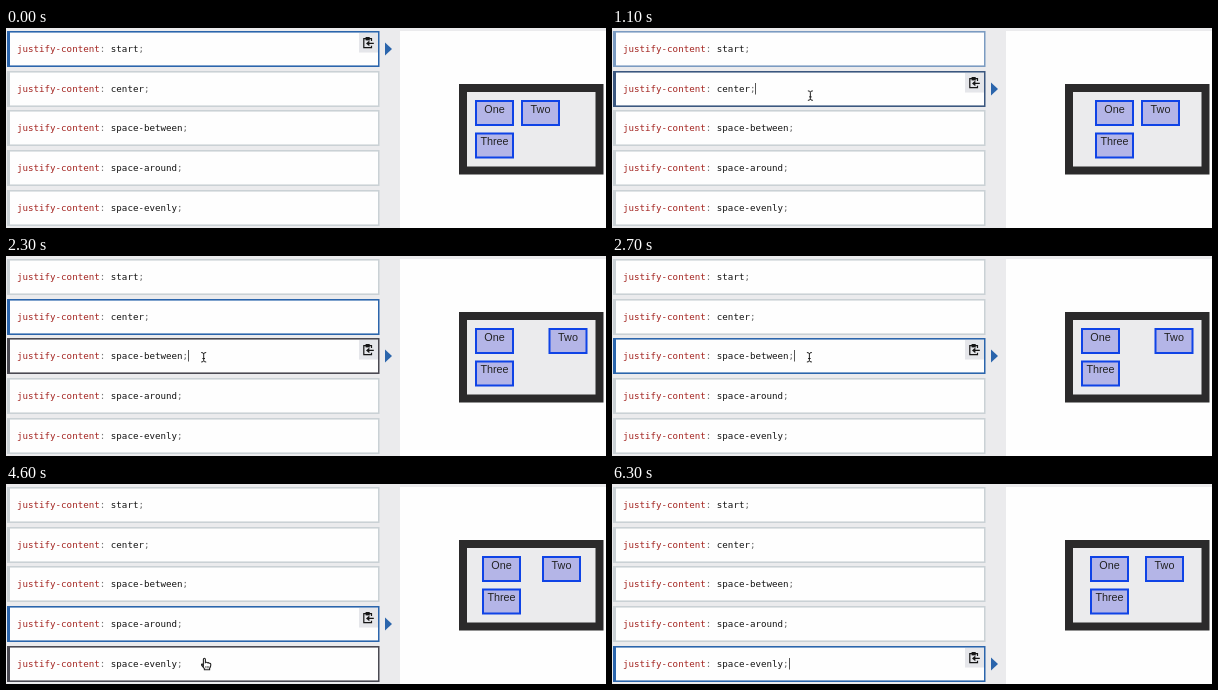
Recreate the animation shown at these times as an HTML page with a canvas. Size 600 by 200 pixels, loop 6400 ms.

```html
<!DOCTYPE html>
<html lang="en">
<head>
<meta charset="utf-8">
<title>justify-content</title>
<style>
html, body { margin: 0; width: 100%; height: 100%; overflow: hidden; background: #ebebed; }
canvas { display: block; width: 600px; height: 200px; }
</style>
</head>
<body>
<canvas id="stage" width="600" height="200"></canvas>
<script>
const ctx = document.getElementById('stage').getContext('2d');
const LOOP = 6400, STEP = 100, FADE = 200;
const IDLE = [202, 209, 213], HOVER = [74, 73, 82], BLUE = [43, 101, 172];
const CHAR = 5.52;

// on/off: selected span, hover: spans under the pointer, one/two: box positions
const rows = [
  { value: 'start', on: -1000, off: 1000, hover: [], one: 469, two: 515 },
  { value: 'center', on: 1000, off: 2300, hover: [[320, 1650]], one: 483, two: 529 },
  { value: 'space-between', on: 2300, off: 4000, hover: [[180, 320], [1650, 3370]], one: 469, two: 542.5 },
  { value: 'space-around', on: 4000, off: 4900, hover: [[120, 180], [3370, 4380]], one: 476, two: 536 },
  { value: 'space-evenly', on: 4900, off: 9999, hover: [[80, 120], [4380, 5800]], one: 478, two: 533 }
];

const pointerPath = [
  [100, 205, 212], [200, 203, 150], [300, 200, 98], [400, 199, 68],
  [1500, 198, 67], [1700, 199, 95], [1900, 198, 101], [3200, 197, 101],
  [3400, 199, 133], [3600, 199, 142], [4250, 199, 142], [4450, 200, 174],
  [4600, 200, 180], [5700, 200, 180], [5900, 203, 215]
];
const beamTimes = [[1000, 1600], [2300, 3700], [4000, 4400], [4900, 5800]];

const clamp = v => Math.max(0, Math.min(1, v));
const mix = (a, b, k) => a.map((v, i) => v + (b[i] - v) * k);
const rgb = c => `rgb(${c.map(Math.round).join(',')})`;
const within = (t, [a, b]) => t >= a && t < b;

function rect(x, y, w, h, color) {
  ctx.fillStyle = color;
  ctx.fillRect(x, y, w, h);
}

function text(str, x, y, color) {
  ctx.fillStyle = color;
  ctx.fillText(str, x, y);
}

// Fade level of a span: rises from a, falls from b
function level(t, [a, b]) {
  const peak = clamp((Math.min(t, b) - a) / FADE);
  return clamp(peak - Math.max(0, t - b) / FADE);
}

function drawCopyButton(y) {
  rect(353, y + 2, 19, 19.5, '#e5e6ea');
  ctx.save();
  ctx.translate(357, y + 6);
  ctx.strokeStyle = '#151515';
  ctx.lineWidth = 1.2;
  ctx.beginPath();
  ctx.moveTo(8.5, 4);
  ctx.lineTo(8.5, 1.6);
  ctx.lineTo(0.8, 1.6);
  ctx.lineTo(0.8, 10.6);
  ctx.lineTo(8.5, 10.6);
  ctx.lineTo(8.5, 8.8);
  ctx.moveTo(10.8, 6.4);
  ctx.lineTo(4.5, 6.4);
  ctx.stroke();
  rect(2.6, 0, 4.1, 3.4, '#151515');
  triangle(3, 6.4, 6.4, 3.6, 6.4, 9.2, '#151515');
  ctx.restore();
}

function triangle(x1, y1, x2, y2, x3, y3, color) {
  ctx.fillStyle = color;
  ctx.beginPath();
  ctx.moveTo(x1, y1);
  ctx.lineTo(x2, y2);
  ctx.lineTo(x3, y3);
  ctx.fill();
}

function drawRow(row, i, t) {
  const y = Math.round(3 + i * 39.7), h = 36;
  const hover = Math.max(0, ...row.hover.map(span => level(t, span)));
  const color = mix(mix(IDLE, HOVER, hover), BLUE, level(t, [row.on, row.off]));
  rect(1, y, 372.5, h, rgb(color));
  rect(4, y + 1.6, 368, h - 3.2, '#fefefe');

  const base = y + 21;
  ctx.font = '9.17px "DejaVu Sans Mono", monospace';
  ctx.textAlign = 'left';
  text('justify-content', 11, base, '#a3231f');
  text(':', 11 + 15 * CHAR, base, '#777');
  text(row.value, 11 + 17 * CHAR, base, '#111');
  const end = 17 + row.value.length;
  text(';', 11 + end * CHAR, base, '#666');

  if (!within(t, [row.on, row.off])) return;
  drawCopyButton(y);
  triangle(379, y + 11.5, 386, y + 18, 379, y + 24.5, rgb(BLUE));
  if (i && (t - row.on) % 1000 < 500) {
    rect(Math.round(11 + (end + 1) * CHAR), y + 12, 1, 11.5, '#555');
  }
}

function drawBox(label, x, y) {
  rect(x, y, 39, 26, '#0f43e6');
  rect(x + 2, y + 2, 35, 22, '#b4b5e7');
  ctx.font = '10.8px "Liberation Sans", Arial, sans-serif';
  ctx.textAlign = 'center';
  text(label, x + 19.5, y + 12.7, '#222');
}

function drawPreview(t) {
  const { one, two } = rows.find(r => within(t, [r.on, r.off]));
  rect(394, 3, 206, 197, '#fefefe');
  rect(453, 56, 144.5, 90.5, '#2b2a2b');
  rect(461, 64, 128.5, 74.5, '#ebebed');
  drawBox('One', one, 72);
  drawBox('Two', two, 72);
  drawBox('Three', one, 104.5);
}

function pointerAt(t) {
  const i = pointerPath.findIndex(p => p[0] > t);
  if (i < 1) return null;
  const a = pointerPath[i - 1], b = pointerPath[i];
  const k = (t - a[0]) / (b[0] - a[0]);
  return mix(a.slice(1), b.slice(1), k);
}

function drawBeam() {
  ctx.strokeStyle = '#222';
  ctx.lineWidth = 1;
  ctx.beginPath();
  ctx.moveTo(-2.5, -4.5);
  ctx.quadraticCurveTo(0, -4.5, 0, -3);
  ctx.quadraticCurveTo(0, -4.5, 2.5, -4.5);
  ctx.moveTo(0, -3);
  ctx.lineTo(0, 3.5);
  ctx.moveTo(-2.5, 5);
  ctx.quadraticCurveTo(0, 5, 0, 3.5);
  ctx.quadraticCurveTo(0, 5, 2.5, 5);
  ctx.moveTo(-1.3, 1.5);
  ctx.lineTo(1.3, 1.5);
  ctx.stroke();
}

function drawHand() {
  const outline = new Path2D(
    'M-2.6 1.5V-4.6Q-2.6 -5.7 -1.6 -5.7T-.6 -4.6V-1.4' +
    'Q.6 -2.3 1.4 -1.2Q2.6 -1.8 3.2 -.7Q4.8 -1 4.8 .8' +
    'Q4.8 3 3.6 4.4V5.8H-1.6V4.6L-4.4 1.2Q-4.8 -.4 -3.5 .1Z'
  );
  ctx.fillStyle = '#fff';
  ctx.fill(outline);
  ctx.strokeStyle = '#222';
  ctx.lineWidth = 1.1;
  ctx.stroke(outline);
  ctx.lineWidth = 0.6;
  ctx.stroke(new Path2D('M-.2 2V4.4M1.3 2V4.4M2.8 2V4.4'));
}

function draw(t) {
  rect(0, 0, 600, 200, '#ebebed');
  rows.forEach((row, i) => drawRow(row, i, t));
  drawPreview(t);
  const pos = pointerAt(t);
  if (!pos) return;
  ctx.save();
  ctx.translate(...pos);
  if (beamTimes.some(span => within(t, span))) drawBeam();
  else drawHand();
  ctx.restore();
}

const began = performance.now();
function tick() {
  const t = (performance.now() - began) % LOOP;
  draw(Math.floor(t / STEP) * STEP);
  requestAnimationFrame(tick);
}
tick();
</script>
</body>
</html>
```
